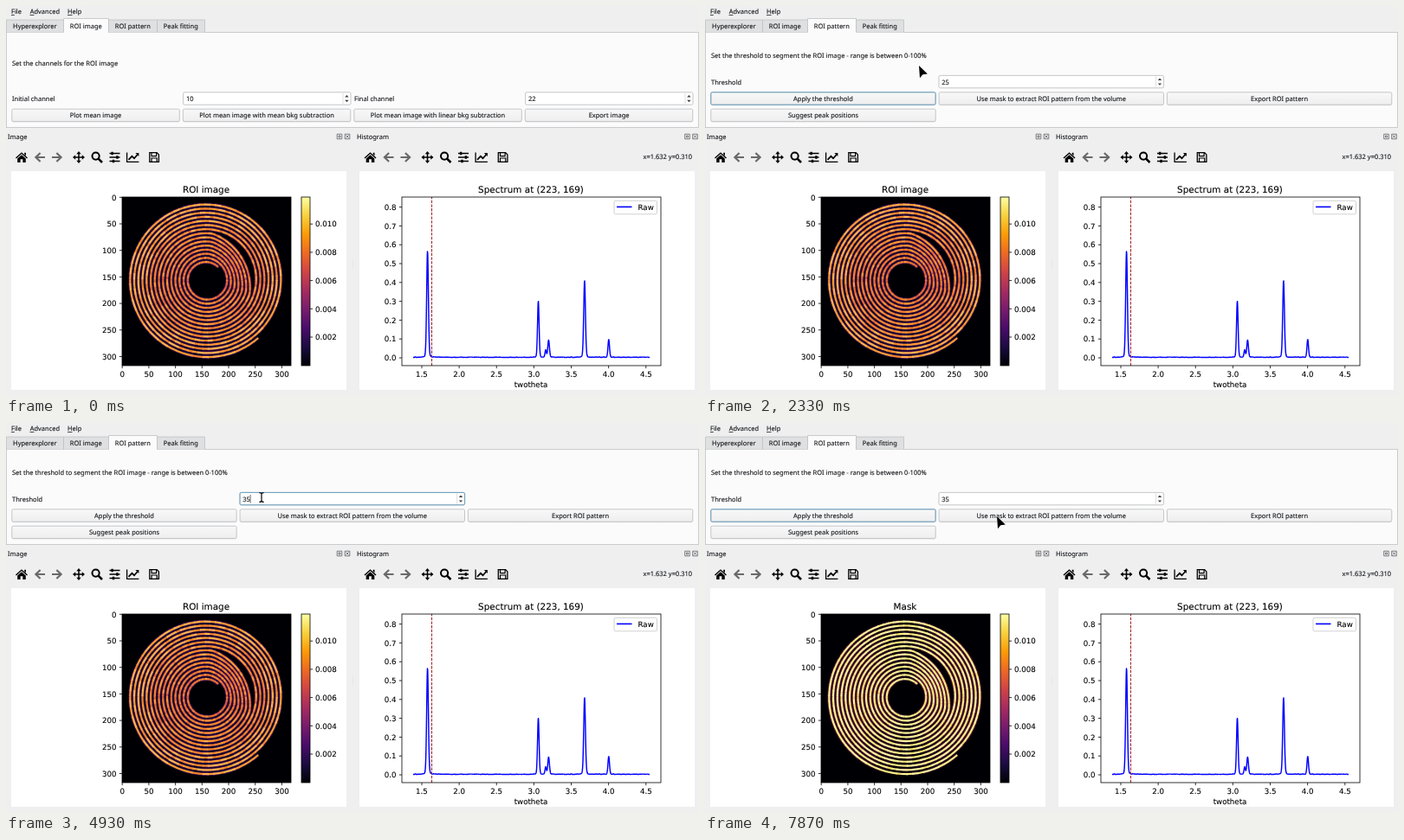
An HTML page that plays this animation: 800 px wide and 450 px high, repeating every 8 s.

```html
<!DOCTYPE html>
<html lang="en">
<head>
<meta charset="utf-8">
<title>ROI segmentation</title>
<style>
html, body { margin: 0; width: 100%; height: 100%; overflow: hidden; background: #efeff0; }
svg { display: block; width: 800px; height: 450px; }
text { white-space: pre; text-rendering: geometricPrecision; }
.ui { font: 7.47px "Noto Sans", sans-serif; fill: #17191b; stroke: #17191b; stroke-width: .12; }
.plot { font: 8.67px "DejaVu Sans", sans-serif; fill: #000; stroke: #000; stroke-width: .1; }
.title { font-size: 10.4px; }
</style>
</head>
<body>
<svg id="stage" viewBox="0 0 800 450" xmlns="http://www.w3.org/2000/svg"></svg>
<script>
const LOOP = 8000;
const INFERNO = ['#000004', '#1b0c41', '#4a0c6b', '#781c6d', '#a52c60',
  '#cf4446', '#ed6925', '#fb9b06', '#f7d13d', '#fcffa4'];

const range = (n, fn) => Array.from({ length: n }, (_, i) => fn(i)).join('');
const noise = i => { const v = Math.sin(i * 12.9898) * 43758.5453; return v - Math.floor(v); };
const rect = (x, y, w, h, attrs) => `<rect x="${x}" y="${y}" width="${w}" height="${h}" ${attrs}/>`;
const path = (d, attrs) => `<path d="${d}" ${attrs}/>`;
const text = (x, y, s, cls = 'ui', anchor = 'start', attrs = '') =>
  `<text x="${x}" y="${y}" class="${cls}" text-anchor="${anchor}" ${attrs}>${s}</text>`;
const label = (x, cy, s) => text(x, cy + 2.7, s);
const group = (id, body, attrs = '') => `<g id="${id}" ${attrs}>${body}</g>`;

// ---- widgets ----
const button = (x, y, w, s) =>
  rect(x, y + .8, w, 14.6, 'rx="1.6" fill="#000" opacity=".09"') +
  rect(x, y, w, 14.4, 'rx="1.6" fill="url(#face)" stroke="#b8babb" stroke-width=".8"') +
  text(x + w / 2, y + 9.8, s, 'ui', 'middle');

const spin = (x, y, w) =>
  rect(x, y, w, 14.4, 'rx="1.6" fill="#fff" stroke="#b8babb" stroke-width=".8"') +
  path(`M${x + w - 9} ${y + 1}v12.4`, 'stroke="#d0d2d3" stroke-width=".7"') +
  path(`M${x + w - 6.8} ${y + 5.6}l2.2 -2.4l2.2 2.4zM${x + w - 6.8} ${y + 9}l2.2 2.4l2.2 -2.4z`, 'fill="#3b3e41"');

const focusRing = (id, x, y, w) =>
  group(id, rect(x, y, w, 14.4, 'rx="1.6" fill="none" stroke="#6aa0be" stroke-width="1"'));

const TABS = [['Hyperexplorer', 0, 66], ['ROI image', 66, 52], ['ROI pattern', 118, 56], ['Peak fitting', 174, 55]];
const tabBar = active => TABS.map(([name, x, w], i) => {
  const on = i === active, top = on ? 14.5 : 16;
  return path(`M${x + .5} 30.5V${top}H${x + w + .5}V30.5`,
    `fill="${on ? '#fcfbfc' : '#dfe0e1'}" stroke="#bfc1c2" stroke-width=".8"`) +
    (on ? path(`M${x + .9} 30.5h${w - .8}`, 'stroke="#fcfbfc" stroke-width="1.6"') : '') +
    text(x + w / 2 + .3, 25.8, name, 'ui', 'middle');
}).join('');

const menu = (x, s) => text(x, 9.2,
  `<tspan text-decoration="underline">${s[0]}</tspan>${s.slice(1)}`);

const dock = (x, s, icons) => label(x, 151, s) +
  path(`M${icons - 2.8} 148.2h5.6v5.6h-5.6zM${icons - 1} 152v-2h2v2zM${icons + 6.2} 148.2h5.6v5.6h-5.6z
    M${icons + 7.4} 149.4l3.2 3.2m0 -3.2l-3.2 3.2`, 'fill="none" stroke="#55585b" stroke-width=".75"');

const toolbar = dx => `<g transform="translate(${dx} 175)" fill="none" stroke="#000" stroke-width="1.5">` +
  path('M11 .6L18 -5.8L25 .6L24 1.5L18 -3.9L12 1.5zM13.2 1.5L18 -2.8L22.8 1.5V6H19.4V2.2H16.6V6H13.2zM21.2 -5.2h1.8v3.4l-1.8 -1.6z', 'fill="#000" stroke="none"') +
  path('M45 0H35M39.6 -5L34.4 0L39.6 5M53 0H63M58.4 -5L63.6 0L58.4 5', 'stroke="#696969" stroke-width="2.2"') +
  path('M84 -5V5M79 0H89', '') +
  path('M84 -7l2.7 3.2h-5.4zM84 7l2.7 -3.2h-5.4zM77 0l3.2 -2.7v5.4zM91 0l-3.2 -2.7v5.4z', 'fill="#000" stroke="none"') +
  '<circle cx="103.6" cy="-1.4" r="4.1" stroke-width="2"/>' +
  path('M106.6 1.6L111 6', 'stroke-width="2.6"') +
  path('M119.5 -4.5h12M119.5 0h12M119.5 4.5h12', 'stroke-width="1.3"') +
  path('M122.6 -6.3v3.6M128.4 -1.8v3.6M124 2.7v3.6', 'stroke-width="2.4"') +
  path('M139.6 -5.5V5.3H153.4', 'stroke-width="1.3"') +
  path('M141.5 2.8L145.4 -1.2L148 1.2L152.4 -3.8', 'stroke-width="1.7"') +
  path('M149.4 -5h4v4z', 'fill="#000" stroke="none"') +
  path('M165.8 -5.3h8.4l2.2 2.2v8.4h-10.6z', 'stroke-width="1.3"') +
  path('M168 -5v3.6h5.6v-3.6M168 5v-4h6.2v4', 'stroke-width="1.2"') + '</g>';

// ---- coiled sample ----
const TURNS = 14.73, PITCH = 4.75, STEPS = 90, GAP_TURN = 7.4;
function coilPoint(turn) {
  const deg = -47 - 360 * turn;
  const wrapped = ((deg % 360) + 540) % 360 - 180;
  let r = 20 + PITCH * turn;
  // inner turns are pushed inwards, which opens the crescent gap
  if (turn < GAP_TURN) r -= 5.2 * Math.max(0, 1 - ((wrapped + 32) / 50) ** 2) * (r - 20) / 33;
  const a = deg * Math.PI / 180;
  return `${(231.5 + r * Math.cos(a)).toFixed(2)} ${(316.7 + r * Math.sin(a)).toFixed(2)}`;
}

function coil(width, colors, shade) {
  const strokes = colors.map(() => '');
  for (let i = 0; i < TURNS * STEPS; i++) {
    const turn = i / STEPS;
    const side = Math.abs(Math.cos((47 + 360 * turn) * Math.PI / 180));
    const bin = Math.floor(Math.max(0, Math.min(.999, shade(turn, side, noise(i)))) * colors.length);
    strokes[bin] += `M${coilPoint(turn)}L${coilPoint(turn + 1.15 / STEPS)}`;
  }
  return strokes.map((d, i) => path(d, `fill="none" stroke="${colors[i]}" stroke-width="${width}"`)).join('');
}

const roiCoil =
  coil(4, ['#25083f', '#3a0a52', '#4f1058'], (t, side, n) => n) +
  coil(2.2, ['#b8405a', '#d65440', '#e66c30', '#f4842a', '#fa9c30', '#fbb54a'],
    (t, side, n) => .48 + .4 * (n - .3) + .018 * t - (t < 10 ? .15 * side : 0));
const maskCoil =
  coil(4, ['#140510', '#3a0d2c', '#641a3a'], (t, side, n) => .75 * side + .35 * n) +
  coil(2.1, ['#e08a50', '#efc05c', '#f5e070', '#f8f084', '#fbf99c'],
    (t, side, n) => .76 + .5 * (n - .4) - (t < 10 ? .12 * side : 0));

// ---- plots ----
const axesFrame = (x, y, w, h) => rect(x, y, w, h, 'fill="none" stroke="#000" stroke-width=".8"');
const tickX = (x, s) => path(`M${x} 416v3.2`, 'stroke="#000" stroke-width=".8"') + text(x, 429.3, s, 'plot', 'middle');
const tickY = (x, y, s) => path(`M${x} ${y}h-3.2`, 'stroke="#000" stroke-width=".8"') + text(x - 6.5, y + 3.2, s, 'plot', 'end');

const imagePlot = rect(6, 191, 387, 253, 'fill="#fff"') +
  rect(134, 221, 195, 195, 'fill="#000004"') +
  group('roiView', roiCoil + text(231, 215.6, 'ROI image', 'plot title', 'middle')) +
  group('maskView', maskCoil + text(231, 215.6, 'Mask', 'plot title', 'middle')) +
  axesFrame(134, 221, 195, 195) +
  range(7, i => tickX(134.2 + i * 30.7, i * 50) + tickY(134, 221.3 + i * 30.7, i * 50)) +
  rect(341, 221, 10, 195, 'fill="url(#inferno)" stroke="#000" stroke-width=".8"') +
  range(5, i => path(`M351 ${383 - i * 32.7}h3.2`, 'stroke="#000" stroke-width=".8"') +
    text(357, 386.2 - i * 32.7, (.002 * (i + 1)).toFixed(3), 'plot'));

// position, height, width of each diffraction peak
const PEAKS = [[486.6, 123, 1], [614.5, 65, .9], [623, 8.5, .8], [626.4, 20, .95], [667.9, 89, 1], [695.8, 20.5, .9]];
const spectrum = 'M' + Array.from({ length: 911 }, (_, i) => {
  const x = 470 + i * .3;
  const y = PEAKS.reduce((sum, [p, h, w]) => {
    const u = (x - p) / w;
    return sum + h * (.88 * Math.exp(-u * u / 2) + .12 / (1 + u * u));
  }, .4 + .5 * noise(Math.floor(i / 6)));
  return `${x.toFixed(1)} ${(407 - y).toFixed(2)}`;
}).join('L');

const histogramPlot = rect(408, 191, 387, 253, 'fill="#fff"') +
  path(spectrum, 'fill="none" stroke="#00f" stroke-width="1.45" stroke-linejoin="round"') +
  path('M491.5 416V221', 'stroke="#a52a2a" stroke-width="1.1" stroke-dasharray="3.3 1.4"') +
  axesFrame(457, 221, 299, 195) +
  range(7, i => tickX(480 + i * 43.13, (1.5 + i * .5).toFixed(1))) +
  range(9, i => tickY(457, 407 - i * 21.8, (i / 10).toFixed(1))) +
  text(606, 441.3, 'twotheta', 'plot', 'middle') +
  text(606, 215.6, 'Spectrum at (223, 169)', 'plot title', 'middle') +
  rect(702, 225.3, 49.5, 15.5, 'rx="1.8" fill="#fff" stroke="#ccc" stroke-width=".9"') +
  path('M705 232.4h17.5', 'stroke="#00f" stroke-width="1.6"') + text(729.5, 235.7, 'Raw', 'plot');

// ---- pages ----
const imagePage = tabBar(1) + label(7, 66.5, 'Set the channels for the ROI image') +
  label(7, 107, 'Initial channel') + spin(204.5, 99.8, 193.5) + label(208, 107, '10') +
  label(402, 107, 'Final channel') + spin(599.5, 99.8, 193.5) + label(603, 107, '22') +
  ['Plot mean image', 'Plot mean image with mean bkg subtraction',
    'Plot mean image with linear bkg subtraction', 'Export image']
    .map((s, i) => button(6.8 + i * 197.5, 119.2, 193.5, s)).join('');

const patternPage = tabBar(2) +
  label(7, 57, 'Set the threshold to segment the ROI image - range is between 0-100%') +
  label(7, 88, 'Threshold') + spin(270, 80.4, 259.6) +
  rect(272.8, 83, 9.8, 9.8, 'id="selection" fill="#3f7ba8"') +
  text(273.2, 90.5, '25', 'ui', 'start', 'id="value"') +
  path('M0 83v9.6', 'id="caret" stroke="#232629" stroke-width=".7"') +
  ['Apply the threshold', 'Use mask to extract ROI pattern from the volume', 'Export ROI pattern']
    .map((s, i) => button(6.8 + i * 263.3, 99.8, 259.4, s)).join('') +
  button(6.8, 119.2, 259.4, 'Suggest peak positions') +
  focusRing('applyFocus', 6.8, 99.8, 259.4) + focusRing('spinFocus', 270, 80.4, 259.6);

const stops = INFERNO.map((c, i) => `<stop offset="${i / 9}" stop-color="${c}"/>`).join('');
const stage = document.getElementById('stage');
stage.innerHTML = `<defs>
  <linearGradient id="inferno" x1="0" y1="1" x2="0" y2="0">${stops}</linearGradient>
  <linearGradient id="face" x1="0" y1="0" x2="0" y2="1"><stop stop-color="#f8f8f9"/><stop offset="1" stop-color="#eeeeef"/></linearGradient>
  </defs>` +
  rect(0, 0, 800, 450, 'fill="#efeff0"') +
  menu(6, 'File') + menu(27.7, 'Advanced') + menu(71, 'Help') +
  rect(.5, 30.5, 799, 110, 'fill="#fcfbfc" stroke="#bfc1c2" stroke-width=".8"') +
  group('imagePage', imagePage) + group('patternPage', patternPage) +
  dock(2, 'Image', 385) + dock(405, 'Histogram', 786.5) +
  toolbar(0) + toolbar(402.5) + text(792, 177.4, 'x=1.632 y=0.310', 'ui', 'end') +
  path('M400.5 293v11', 'stroke="#dedfe0" stroke-width="1" stroke-dasharray="1 1.5"') +
  imagePlot + histogramPlot +
  group('arrow', path('M0 0L1 14.2L4.4 10.3L9.8 9.6Z', 'fill="#000" stroke="#fff" stroke-width=".9" stroke-linejoin="round" paint-order="stroke"')) +
  group('beam', path('M-2.6 -5.4Q0 -5.4 0 -4V4Q0 5.4 -2.6 5.4M2.6 -5.4Q0 -5.4 0 -4M0 4Q0 5.4 2.6 5.4',
    'fill="none" stroke="#000" stroke-width="1.2"'));

// ---- timeline ----
const POINTER = [[200, 230, -20], [650, 150, 33], [930, 119, 41], [1070, 122, 38], [1480, 146, 23], [1860, 146, 23],
  [2330, 247, 69], [2900, 295, 86], [5200, 295, 86], [5600, 219, 100], [6400, 219, 100],
  [6870, 310.5, 83.5], [7200, 332, 106], [7330, 332, 106], [7800, 337, 108]];

function pointerAt(t) {
  const next = POINTER.findIndex(k => k[0] > t);
  if (next < 1) return next < 0 ? POINTER.at(-1).slice(1) : POINTER[0].slice(1);
  const [t0, x0, y0] = POINTER[next - 1], [t1, x1, y1] = POINTER[next];
  const u = (t - t0) / (t1 - t0), e = u * u * (3 - 2 * u);
  return [x0 + (x1 - x0) * e, y0 + (y1 - y0) * e];
}

const $ = id => document.getElementById(id);
const show = (id, on) => $(id).setAttribute('display', on ? 'inline' : 'none');
const between = (t, a, b) => t >= a && t < b;

function render(t) {
  const pattern = t >= 1800, editing = between(t, 3050, 5600), selected = between(t, 3550, 4550);
  const masked = t >= 5850;
  show('imagePage', !pattern);
  show('patternPage', pattern);
  show('applyFocus', !editing);
  show('spinFocus', editing);
  show('selection', selected);
  show('caret', editing && !selected);
  show('roiView', !masked);
  show('maskView', masked);

  const value = t < 4550 ? '25' : t < 4750 ? '3' : '35';
  $('value').textContent = value;
  $('value').style.fill = $('value').style.stroke = selected ? '#fff' : '';
  $('caret').setAttribute('transform', `translate(${273.6 + value.length * 4.27} 0)`);

  const [x, y] = pointerAt(t);
  const overField = pattern && between(x, 270, 521) && between(y, 80, 95);
  show('arrow', !overField);
  show('beam', overField);
  for (const id of ['arrow', 'beam']) $(id).setAttribute('transform', `translate(${x.toFixed(2)} ${y.toFixed(2)})`);
}

const start = performance.now();
function tick() {
  render((performance.now() - start) % LOOP);
  requestAnimationFrame(tick);
}
render(0);
requestAnimationFrame(tick);
</script>
</body>
</html>
```
